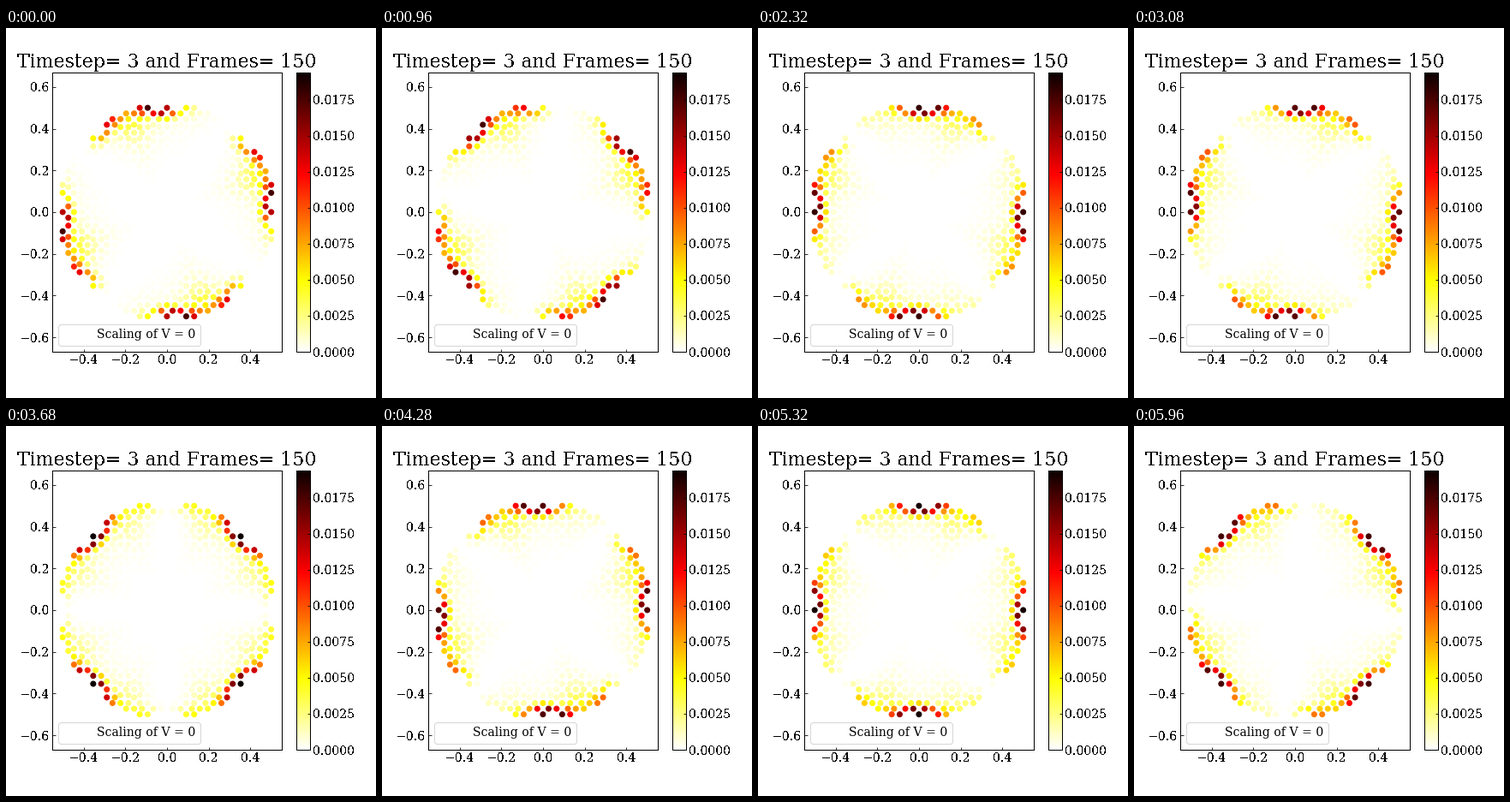
These frames come from a looping animation (432 px wide and 432 px high, 6 s). A matplotlib script:

```python
import numpy as np
import matplotlib.pyplot as plt
from matplotlib.animation import FuncAnimation
from matplotlib.cm import ScalarMappable
from matplotlib.colors import Normalize
from matplotlib.lines import Line2D

FRAMES, INTERVAL = 150, 40
VMAX = 0.0194
START, RATE = 0.17, -0.1595     # phase of the wave, in turns and turns per frame
R2 = np.sqrt(2)
INRADIUS = 6 + 5 * R2

plt.rcParams.update({
    "font.family": "DejaVu Serif",
    "font.size": 14,
    "text.antialiased": False,
    "axes.linewidth": 1.0,
    "xtick.direction": "in",
    "ytick.direction": "in",
})


def tiling():
    """Ammann-Beenker vertices (cut and project) inside a regular octagon."""
    ints, halves = np.arange(-9, 10), np.arange(-12, 13)
    a, p, c, q = (m.ravel() for m in np.meshgrid(ints, halves, ints, halves))
    u, v = np.abs(a - p / R2), np.abs(c - q / R2)
    w = (1 + R2) / 2
    ok = ((p + q) % 2 == 0) & (u < w) & (v < w) & (u + v < w * R2)
    x, y = (a + p / R2)[ok], (c + q / R2)[ok]
    reach = np.maximum(np.maximum(np.abs(x), np.abs(y)),
                       (np.abs(x) + np.abs(y)) / R2)
    inside = reach < INRADIUS + 0.01
    return x[inside], y[inside]


def edge_mode(x, y):
    """Peak density and phase of the four-lobed edge wave at every site."""
    r, angle = np.hypot(x, y), np.arctan2(-x, y)
    sector = np.round(angle / (np.pi / 4))
    off = angle - sector * np.pi / 4
    along = r * np.sin(np.abs(off))
    depth = np.maximum(INRADIUS - r * np.cos(off), 0)

    # bright along the sides, with a fainter tail behind the corners
    side = np.exp(-0.35 * depth ** 4 - 0.4 * depth * along - (along / 4.4) ** 4)
    tail = (0.14 + 0.45 * np.sin(4 * off) ** 4) * np.exp(-depth / 2)
    peak = side + tail * np.tanh(2 * depth)
    return peak * VMAX, 4 * angle + 0.25 * np.sin(8 * angle)


x, y = tiling()
peak, phase = edge_mode(x, y)


def density(i):
    turns = START + RATE * i
    return peak * (1 + np.cos(2 * np.pi * turns - phase)) / 2


fig = plt.figure(figsize=(6, 6), dpi=72, facecolor="white")
ax = fig.add_axes([0.125, 0.125, 0.62, 0.755])
ax.set_xlim(-0.55, 0.55)
ax.set_ylim(-0.55 * 0.755 / 0.62, 0.55 * 0.755 / 0.62)
ax.set_xticks(np.arange(-2, 3) * 0.2)
ax.set_yticks(np.arange(-3, 4) * 0.2)
ax.set_title("Timestep= 3 and Frames= 150", fontsize=22)

norm = Normalize(0, VMAX)
scale = 0.5 / INRADIUS
dots = ax.scatter(x * scale, y * scale, c=density(0), cmap="hot_r", norm=norm)
legend = ax.legend([Line2D([], [], color="none")], ["Scaling of V = 0"],
                   loc="lower left")
legend.get_texts()[0].set_antialiased(True)

cax = fig.add_axes([0.78375, 0.125, 0.755 / 20, 0.755])
fig.colorbar(ScalarMappable(norm, "hot_r"), cax=cax,
             ticks=np.arange(8) * 0.0025)


def update(i):
    dots.set_array(density(i))
    return (dots,)


anim = FuncAnimation(fig, update, frames=FRAMES, interval=INTERVAL,
                     repeat=True, repeat_delay=0, blit=False)
plt.show()
```
